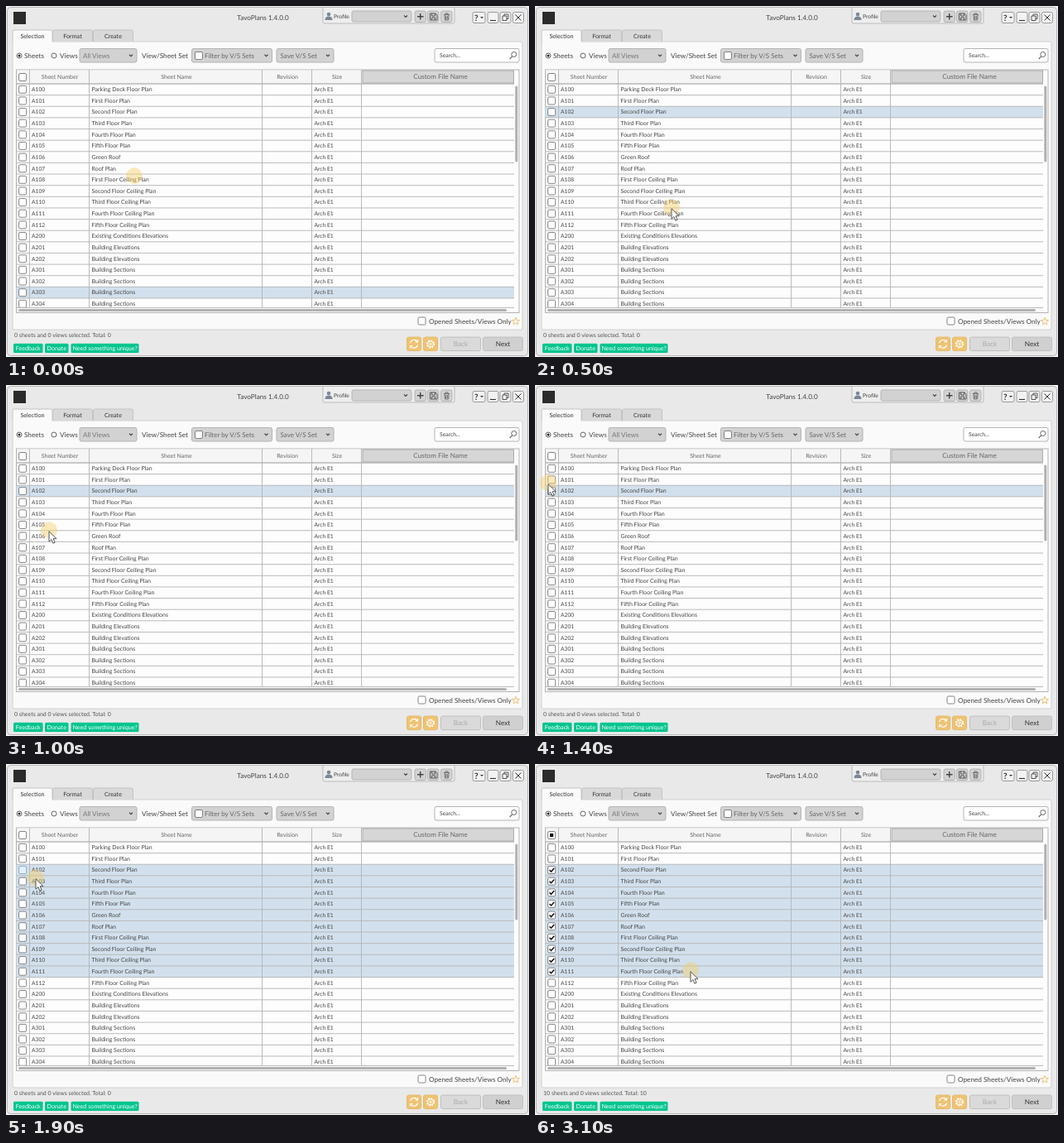
Recreate the animation shown at these times as an HTML page. Size 632 px wide and 424 px high, loop 3.9 s.

```html
<!DOCTYPE html>
<html lang="en">
<head>
<meta charset="utf-8">
<title>Sheet selection</title>
<style>
  html, body { margin: 0; width: 100%; height: 100%; overflow: hidden; background: #f4f4f4; }
  svg { display: block; width: 632px; height: 424px; }
  text { font-family: Lato, "Open Sans", sans-serif; text-rendering: geometricPrecision; }
</style>
</head>
<body>
<svg id="stage" viewBox="0 0 632 424" xmlns="http://www.w3.org/2000/svg"></svg>
<script>
const LOOP = 3900, STEP = 100;
const ROW_TOP = 94, ROW_H = 13.63;
const LINE = "#b4b4b4", BOX_LINE = "#777", INK = "#444";
const COLUMNS = [28.5, 100.5, 309.5, 369.5, 429.5];
const FIRST = 2, LAST = 11, INITIAL = 18;
const ordinals = ["First", "Second", "Third", "Fourth", "Fifth"];
const sheets = [
  ["A100", "Parking Deck Floor Plan"],
  ...ordinals.map((n, i) => ["A10" + (i + 1), n + " Floor Plan"]),
  ["A106", "Green Roof"], ["A107", "Roof Plan"],
  ...ordinals.map((n, i) => ["A" + (108 + i), n + " Floor Ceiling Plan"]),
  ["A200", "Existing Conditions Elevations"],
  ["A201", "Building Elevations"], ["A202", "Building Elevations"],
  ...[1, 2, 3, 4].map(i => ["A30" + i, "Building Sections"])
];

// Pointer path: time, x, y
const PATH = [
  [0, 155, 206], [100, 150, 150], [200, 148, 129], [300, 152, 165], [400, 160, 215],
  [500, 165, 244], [600, 165, 244], [700, 150, 234], [1000, 52, 176], [1200, 21, 126],
  [1300, 17, 120], [1400, 16, 119], [1500, 21, 128], [1800, 24, 129],
  [1900, 36, 138], [2000, 70, 163], [2200, 152, 224], [2300, 179, 244], [2400, 188, 250], [LOOP, 188, 250]
];

const rect = (x, y, w, h, fill, stroke = "none", r = 0, extra = "") =>
  `<rect x="${x}" y="${y}" width="${w}" height="${h}" rx="${r}" fill="${fill}" stroke="${stroke}" ${extra}/>`;
const text = (x, y, s, size = 7, fill = INK, anchor = "start", extra = "") =>
  `<text x="${x}" y="${y}" font-size="${size}" fill="${fill}" text-anchor="${anchor}" ${extra}>${s}</text>`;
const path = (d, stroke = "#555", width = 1, fill = "none", extra = "") =>
  `<path d="${d}" stroke="${stroke}" stroke-width="${width}" fill="${fill}" ${extra}/>`;
const circle = (x, y, r, fill, stroke = "none") =>
  `<circle cx="${x}" cy="${y}" r="${r}" fill="${fill}" stroke="${stroke}"/>`;
const box = (x, y, extra = `stroke="${BOX_LINE}"`) =>
  `<rect x="${x}" y="${y}" width="9" height="9" rx="1.5" fill="#fff" stroke-width=".9" ${extra}/>`;
const chevron = (x, y) => path(`M${x - 2} ${y - 1}l2 2 2-2`, "#444", 1.1);
const combo = (x, y, w, h) => rect(x, y, w, h, "#d2d2d2", LINE, 2) + chevron(x + w - 7, y + h / 2);
const rowY = i => ROW_TOP + i * ROW_H;

function frame() {
  const tab = (x, label, active) =>
    path(`M${x} 43V31q0-2 2-2h44q2 0 2 2v12`, "#c4c4c4", 1, active ? "#fafafa" : "#d9d9d9") +
    text(x + 24, 38.5, label, 7.2, "#333", "middle");
  return rect(0, 0, 632, 424, "#f4f4f4") +
    rect(1.5, 1.5, 629, 421, "#e9e9e9", "#b5b5b5", 4) +
    rect(9, 7, 15, 15, "#2b2b2b") +
    text(310.5, 17, "TavoPlans 1.4.0.0", 8.2, INK, "middle") +
    rect(8, 43, 616, 348, "#fafafa", "#d0d0d0", 2) +
    tab(8, "Selection", true) + tab(56.5, "Format") + tab(105.5, "Create") +
    rect(9, 42, 46.5, 3, "#fafafa");
}

function profileBar() {
  const icons = [494, 509.5, 525.5].map(x => rect(x, 6, 13.5, 13.5, "#d2d2d2", LINE, 2)).join("");
  return path("M383 2V19q0 2 2 2H540q2 0 2-2V2", "#bbb", 1, "#eee") +
    circle(390, 10, 2.3, "#7b8797") + path("M385.5 17q0-4.5 4.5-4.5t4.5 4.5z", "none", 0, "#7b8797") +
    text(396, 15, "Profile", 6.7) + combo(418, 6, 72, 13) + icons +
    path("M497 12.7h7.5M500.7 9v7.5", "#444", 1.4) +
    path("M512.5 9h6.5l2 2v6h-8.5zM514.5 9v3h4V9M514.5 17v-3h4v3") +
    path("M529 10.5h7M531 10.5V9h3v1.5M530 11l.5 6h4l.5-6M531.7 12v4M533.3 12v4", "#666", .9);
}

function windowButtons() {
  return [[564, 15], [582, 13], [597, 13], [612.5, 13]]
      .map(([x, w]) => rect(x, 7.5, w, 13, "#f2f2f2", "#999", 2)).join("") +
    text(566, 17.8, "?", 10, "#333", "start", 'font-weight="700"') + path("M573 13h4l-2 2z", "none", 0, "#333") +
    path("M585 17.5h7", "#333", 1.1) + path("M600 12h5v5.5h-5zM602 12v-2h5v5.5h-2", "#444", .9) +
    path("M615.5 10.5l7 7M622.5 10.5l-7 7", "#333", 1);
}

function toolbar() {
  return circle(16, 60, 3, "#fff", "#666") + circle(16, 60, 1.5, "#222") + text(22, 62.7, "Sheets", 8.2) +
    circle(58, 60, 3, "#fff", "#666") + text(65, 62.7, "Views", 8.2) +
    combo(89, 51.5, 69, 16.5) + text(93, 62.7, "All Views", 8.1, "#777") +
    text(164, 62.7, "View/Sheet Set", 8.2) +
    combo(224.5, 51.5, 97, 16.5) + box(228.5, 55.5) + text(240, 62.7, "Filter by V/S Sets", 8, "#666") +
    combo(327, 51.5, 69, 16.5) + text(331.5, 62.7, "Save V/S Set", 8, "#666") +
    rect(518, 51.5, 102, 16.5, "#fff", LINE, 2) + text(524, 62.3, "Search...", 6.8) +
    circle(613.8, 58.5, 3, "none", "#666") + path("M611.7 60.8l-3 3.2", "#666", 1.1);
}

function table() {
  const heads = [[65, "Sheet Number"], [206, "Sheet Name"], [340, "Revision"], [400, "Size"]];
  const rows = sheets.map(([number, name], i) => {
    const y = rowY(i), base = y + 9.1;
    return rect(12.5, y, 601.5, ROW_H, "#d2e0ed", "none", 0, `id="row${i}"`) +
      path(`M12 ${y}H614`, LINE, .9) +
      box(15.6, y + 2.3, `id="box${i}"`) +
      path(`M17.5 ${y + 6.8}l2 2 3.7-4.2`, "#111", 1.5, "none", `id="tick${i}"`) +
      text(31, base, number, 6.7) + text(103.5, base, name) + text(372.5, base, "Arch E1", 6.7);
  }).join("");
  return rect(12.5, 77, 607.5, 293.5, "#fdfdfd", LINE) +
    rect(13, 77.5, 416, 16.5, "#f5f5f5") +
    `<clipPath id="body"><rect x="12" y="93" width="603" height="271"/></clipPath>` +
    `<g clip-path="url(#body)">${rows}</g>` +
    COLUMNS.map(x => path(`M${x} 77V364`, LINE, .9)).join("") +
    path("M12 94H614M12 364.5H614", LINE, .9) +
    rect(431, 78, 182.5, 15, "#d6d6d6", "#aaa") + text(525, 88.2, "Custom File Name", 8.1, "#666", "middle") +
    heads.map(([x, s]) => text(x, 88, s, 7, "#666", "middle")).join("") +
    box(15.6, 81.5) + rect(18, 83.9, 4.2, 4.2, "#111", "none", 0, 'id="partial"') +
    rect(615.3, 96.5, 3, 92, "#b0b0b0", "none", 1.5) + rect(15, 366, 590, 3, "#b0b0b0", "none", 1.5);
}

function footer() {
  const star = Array.from({ length: 10 }, (_, i) => {
    const a = -Math.PI / 2 + i * Math.PI / 5, r = i % 2 ? 2 : 4.7;
    return `${(616 + r * Math.cos(a)).toFixed(2)} ${(381 + r * Math.sin(a)).toFixed(2)}`;
  }).join("L");
  const green = (x, w, s) =>
    rect(x, 407.8, w, 11.2, "#00c58e", "none", 1.5) + text(x + w / 2, 416, s, 7.2, "#fff", "middle");
  const button = (x, s, color, fill) =>
    rect(x, 400, 48, 16.5, fill, "#c0c0c0", 2) + text(x + 24, 411, s, 8.2, color, "middle");
  return box(498, 376) + text(511, 383.7, "Opened Sheets/Views Only", 8.2) +
    path(`M${star}Z`, "#eebb62", .9) +
    text(10, 400.3, "", 7, "#555", "start", 'id="status"') +
    green(9, 35.5, "Feedback") + green(47, 28.5, "Donate") + green(78.5, 82, "Need something unique?") +
    [484.5, 504.5].map(x => rect(x, 400, 17, 16.5, "#efc373", "#e3bb70", 2)).join("") +
    path("M488.5 407a4.7 4.7 0 0 1 8.5-1.5M497.5 409.5a4.7 4.7 0 0 1-8.5 1.5M497.5 403v3h-3M488.5 413.5v-3h3", "#fff", 1.1) +
    `<circle cx="513" cy="408.3" r="4.4" fill="none" stroke="#fff" stroke-width="1.6" stroke-dasharray="1.73"/>` +
    circle(513, 408.3, 3.5, "none", "#fff") + circle(513, 408.3, 1.2, "none", "#fff") +
    button(525.5, "Back", "#aaa", "#dadada") + button(576.5, "Next", "#333", "#d0d0d0");
}

function pointer() {
  return `<g id="pointer"><circle cy="-.7" r="10" fill="#f5cf68" opacity=".45"/>` +
    path("M0 .7v12.5l2.9-2.7 2 4.7 2.2-1-2-4.5h4z", "#444", .9, "#fff", 'id="arrow" stroke-linejoin="round"') + "</g>";
}

document.getElementById("stage").innerHTML =
  frame() + profileBar() + windowButtons() + toolbar() + table() + footer() + pointer();

const byId = id => document.getElementById(id);
const show = (el, on) => el.setAttribute("visibility", on ? "visible" : "hidden");
const rowParts = sheets.map((_, i) => ["row", "box", "tick"].map(part => byId(part + i)));
const [partial, status, pointerEl, arrow] = ["partial", "status", "pointer", "arrow"].map(byId);

function pointerAt(t) {
  const i = PATH.findIndex(p => p[0] > t);
  const [t0, x0, y0] = PATH[i - 1], [t1, x1, y1] = PATH[i];
  const k = (t - t0) / (t1 - t0);
  return [x0 + (x1 - x0) * k, y0 + (y1 - y0) * k];
}

function render(time) {
  const t = Math.floor((time % LOOP) / STEP) * STEP;
  const range = t >= 1500, checked = t >= 2600;
  rowParts.forEach(([row, check, tick], i) => {
    const inRange = i >= FIRST && i <= LAST;
    show(row, range ? inRange : i === (t < 200 ? INITIAL : FIRST));
    show(tick, checked && inRange);
    const hover = i === FIRST && range && t < 2800;
    check.setAttribute("fill", hover ? "#e3f0fb" : "#fff");
    check.setAttribute("stroke", hover ? "#7fa9cb" : BOX_LINE);
  });
  show(partial, checked);
  const count = checked ? 10 : 0;
  status.textContent = `${count} sheets and 0 views selected. Total: ${count}`;
  pointerEl.setAttribute("transform", `translate(${pointerAt(t)})`);
  show(arrow, t >= 100);
}

const start = performance.now();
function tick() {
  render(performance.now() - start);
  requestAnimationFrame(tick);
}
tick();
</script>
</body>
</html>
```
